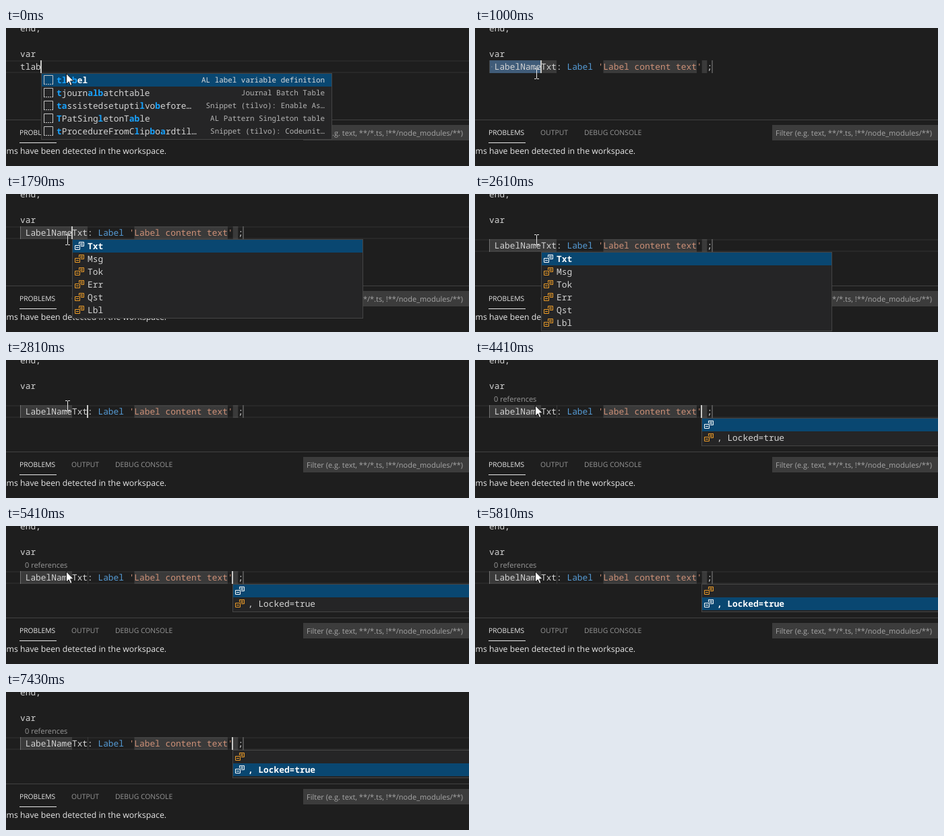
Recreate the animation shown at these times as an HTML page. Size 687 px wide and 205 px high, loop 7830 ms.

```html
<!DOCTYPE html>
<html lang="en">
<head>
<meta charset="utf-8">
<title>Snippet choices in a code editor</title>
<style>
  html, body { margin: 0; width: 100%; height: 100%; overflow: hidden; background: #1e1e1e; }
  svg { display: block; width: 687px; height: 205px; }
  text { white-space: pre; text-rendering: geometricPrecision; fill: #d4d4d4; }
  .code { font: 500 12.83px "Noto Sans Mono", "DejaVu Sans Mono", monospace; }
  .detail { font: 10.9px "Noto Sans Mono", "DejaVu Sans Mono", monospace; text-anchor: end; fill: #b4b4b4; }
  .ui { font-family: "Open Sans", "Noto Sans", sans-serif; }
  .code.active { font-weight: 600; fill: #fff; }
  .detail.active { fill: #dcdcdc; }
  .match { fill: #18a3ff; font-weight: 600; }
  .keyword { fill: #569cd6; }
  .string { fill: #ce9178; }
  .dots { fill: #e3e4e2; fill-opacity: .3; }
</style>
</head>
<body>
<svg id="stage" viewBox="0 0 687 205"></svg>
<script>
const LOOP = 7830;
const LEFT = 21, CHAR = 7.7, LINE = 19, POPUP_WIDTH = 432;
const column = n => LEFT + n * CHAR;

// Matched letters stand in square brackets.
const suggestions = [
  ['[tlab]el', 'AL label variable definition'],
  ['[t]journ[alb]atchtable', 'Journal Batch Table'],
  ['[ta]ssistedsetupti[l]vo[b]efore…', 'Snippet (tilvo): Enable As…'],
  ['[T]PatSing[l]etonT[ab]le', 'AL Pattern Singleton table'],
  ['[t]ProcedureFromC[l]ip[b]o[a]rdtil…', 'Snippet (tilvo): Codeunit…']
];
const suffixes = ['Txt', 'Msg', 'Tok', 'Err', 'Qst', 'Lbl'].map(name => [name]);
const endings = [[''], [', Locked=true']];

const ARROW = 'arrow', BEAM = 'beam';

// Each step changes part of the state that the earlier steps left.
const steps = [
  [0, { top: 48, expanded: false, caret: 51, selection: null, lens: false, suffixChosen: false,
        mouse: [ARROW, 89, 67], popup: { x: 52, rows: suggestions, selected: 0 } }],
  [400, { caret: null }],
  [1000, { expanded: true, caret: 97, selection: [0, 10], mouse: [BEAM, 88, 60], popup: null }],
  [1390, { caret: null }],
  [1790, { caret: 97, selection: null, popup: { x: 98, rows: suffixes, selected: 0 } }],
  [2190, { caret: null }],
  [2610, { top: 67 }],
  [2810, { caret: 120, suffixChosen: true, popup: null }],
  [3210, { caret: null }],
  [3610, { caret: 328, selection: [22, 40] }],
  [4010, { caret: null }],
  [4210, { lens: true, mouse: [ARROW, 89, 67] }],
  [4410, { caret: 335, selection: null, popup: { x: 336, rows: endings, selected: 0 } }],
  [5010, { caret: null }],
  [5410, { caret: 335 }],
  [5610, { popup: { x: 336, rows: endings, selected: 1 } }],
  [5810, { caret: null }],
  [6410, { caret: 335 }],
  [6830, { caret: null, mouse: [BEAM, 248, 38] }],
  [7030, { mouse: [BEAM, 456, 76] }],
  [7230, { mouse: null }],
  [7430, { caret: 335 }]
];

const rect = (x, y, w, h, fill, extra = '') =>
  `<rect x="${x}" y="${y}" width="${w}" height="${h}" fill="${fill}" ${extra}/>`;
const text = (x, y, content, cls = 'code', extra = '') =>
  `<text x="${x}" y="${y}" class="${cls}" ${extra}>${content}</text>`;
const ui = (x, y, content, size, fill) =>
  text(x, y, content, 'ui', `style="font-size:${size}px;fill:${fill}"`);
const span = (cls, content) => `<tspan class="${cls}">${content}</tspan>`;
const lineArt = (x, y, d, stroke) =>
  `<path transform="translate(${x} ${y})" d="${d}" fill="none" stroke="${stroke}"/>`;

function panel() {
  return rect(0, 136, 687, 1, '#414141') +
    ui(20, 159, 'PROBLEMS', 10.3, '#e7e7e7') +
    rect(20, 170, 55, 1, '#e7e7e7') +
    ui(97, 159, 'OUTPUT', 10.4, '#979797') +
    ui(162, 159, 'DEBUG CONSOLE', 10.4, '#979797') +
    rect(441, 144, 246, 23, '#3c3c3c') +
    ui(446, 159.5, 'Filter (e.g. text, **/*.ts, !**/node_modules/**)', 11, '#a6a6a6') +
    ui(0.5, 187, 'ms have been detected in the workspace.', 12.32, '#e7e7e7');
}

function lineHighlight(top) {
  return rect(0, top, 687, 2, '#282828') + rect(0, top + LINE - 2, 687, 2, '#282828');
}

function expandedLine({ top, selection, suffixChosen }) {
  const block = (from, to, fill) => rect(column(from), top, (to - from) * CHAR, LINE, fill);
  const placeholder = (from, to) => block(from, to, 'rgba(124,124,124,.3)');
  const code = ' LabelNameTxt: ' + span('keyword', 'Label') + ' ' +
    span('string', "'Label content text'") + ' ;';
  let out = '';
  if (selection) out += block(...selection, '#264f78');
  out += placeholder(0, 10) + placeholder(22, 40) + placeholder(41, 42);
  out += suffixChosen ? rect(121, top, 1, LINE, '#3a3a3a') : placeholder(10, 13);
  // Indent guide on the left, final tab stop on the right.
  out += rect(LEFT, top, 1, LINE, selection ? '#404040' : '#707070');
  out += rect(351, top, 2, LINE, '#525252');
  out += text(LEFT, top + 14, code);
  if (selection) {
    const spaces = selection[0] ? [27, 35] : [0];
    out += spaces.map(n => text(column(n), top + 14, '·', 'code dots')).join('');
  }
  return out;
}

function snippetIcon(x, y) {
  return lineArt(x, y, 'M1.5 14V1.5H14.5V14M1 14.5H3M4 14.5H6M7 14.5H9M10 14.5H12M13 14.5H15', '#c5c5c5');
}

function choiceIcon(x, y, color) {
  return lineArt(x, y, 'M7.5 6V2.5H14.5V8.5H10M9 4.5H13M9 6.5H13' +
    'M1.5 7.5H8.5V13.5H1.5ZM3 10.5H7', color);
}

function popup({ x, rows, selected }, top) {
  const height = rows.length * LINE + 4;
  let out = rect(x + .5, top + .5, POPUP_WIDTH - 1, height - 1, '#252526', 'stroke="#454545"');
  rows.forEach(([label, detail], i) => {
    const y = top + 1 + i * LINE, active = i === selected;
    const state = active ? ' active' : '';
    if (active) out += rect(x + 1, y, POPUP_WIDTH - 2, LINE, '#094771');
    out += detail ? snippetIcon(x + 3, y + 1)
                  : choiceIcon(x + 3, y + 1, active ? '#fff' : '#ee9d28');
    const marked = label.replace(/\[(.*?)\]/g, (_, letters) => span('match', letters));
    out += text(x + 23, y + 14, marked, 'code' + state);
    if (detail) out += text(x + 421, y + 13, detail, 'detail' + state);
  });
  return out;
}

function pointer([kind, x, y]) {
  if (kind === BEAM)
    return lineArt(x, y, 'M0 .5H3M4 .5H7M3.5 1V15M0 15.5H3M4 15.5H7', '#e6e6e6');
  return `<path transform="translate(${x} ${y})" d="M.5 .8V16.2L4.2 12.8L6.6 18.4L9 17.4L6.6 11.8H11.4Z"
    fill="#fff" stroke="#000" stroke-width=".9"/>`;
}

function draw(state) {
  const { top, expanded, selection, caret, lens, mouse } = state;
  return panel() +
    (selection ? '' : lineHighlight(top)) +
    text(LEFT, 5, 'end;') + text(LEFT, 43, 'var') +
    (lens ? ui(28, 62, '0 references', 11, '#999') : '') +
    (expanded ? expandedLine(state) : text(LEFT, top + 14, 'tlab')) +
    (caret === null ? '' : rect(caret, top, 2, LINE, '#c8c8c6')) +
    (state.popup ? popup(state.popup, top + LINE) : '') +
    (mouse ? pointer(mouse) : '');
}

const stage = document.getElementById('stage');
let shown = 0;

function frame() {
  const time = performance.now() % LOOP;
  const passed = steps.filter(([start]) => start <= time);
  if (passed.length !== shown) {
    shown = passed.length;
    stage.innerHTML = draw(Object.assign({}, ...passed.map(([, change]) => change)));
  }
  requestAnimationFrame(frame);
}
frame();
</script>
</body>
</html>
```
